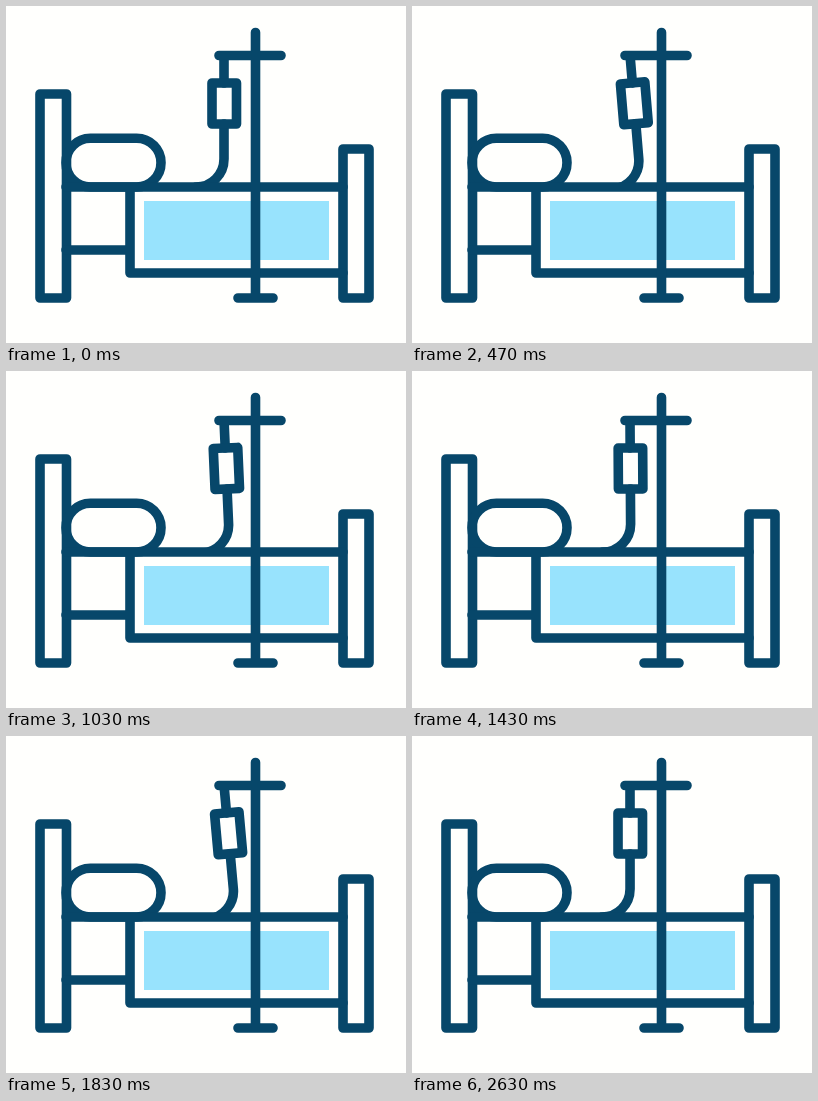
An HTML page that plays this animation: 400x337 px, repeating every 2660 ms.

```html
<!DOCTYPE html>
<html lang="en">
<head>
<meta charset="utf-8">
<title>Hospital bed</title>
<style>
  html, body { margin: 0; height: 100%; overflow: hidden; background: #fffffd; }
  svg { display: block; width: 100%; height: 100%; }
  .line { fill: none; stroke: #07476a; stroke-width: 9.6; stroke-linecap: round; stroke-linejoin: round; }
</style>
</head>
<body>
<svg viewBox="0 0 400 337">
  <clipPath id="aboveBed"><rect width="400" height="182"/></clipPath>
  <rect x="138" y="195" width="185" height="59" fill="#98e3fd"/>
  <g class="line">
    <g clip-path="url(#aboveBed)">
      <g id="drip">
        <path d="M218 50V77M218 118V153A28 28 0 0 1 190 181"/>
        <rect x="206" y="77" width="24.5" height="41"/>
      </g>
    </g>
    <rect x="34" y="88" width="26.5" height="204"/>
    <rect x="337" y="143" width="26" height="149"/>
    <rect x="60" y="132.3" width="95" height="48.7" rx="24.35"/>
    <path d="M60 181H337M60 244H124M124 181V267H337"/>
    <path d="M249.5 26.5V292M213 49.5H275M232 292H267"/>
  </g>
</svg>
<script>
  const LOOP = 2660, SWINGS = 2, MAX_ANGLE = 6;
  const drip = document.getElementById('drip');

  function draw(now) {
    const phase = (now % LOOP) / LOOP * SWINGS * 2 * Math.PI;
    const angle = -MAX_ANGLE * (1 - Math.cos(phase)) / 2;
    drip.setAttribute('transform', `rotate(${angle} 218 49)`);
    requestAnimationFrame(draw);
  }
  draw(performance.now());
</script>
</body>
</html>
```
